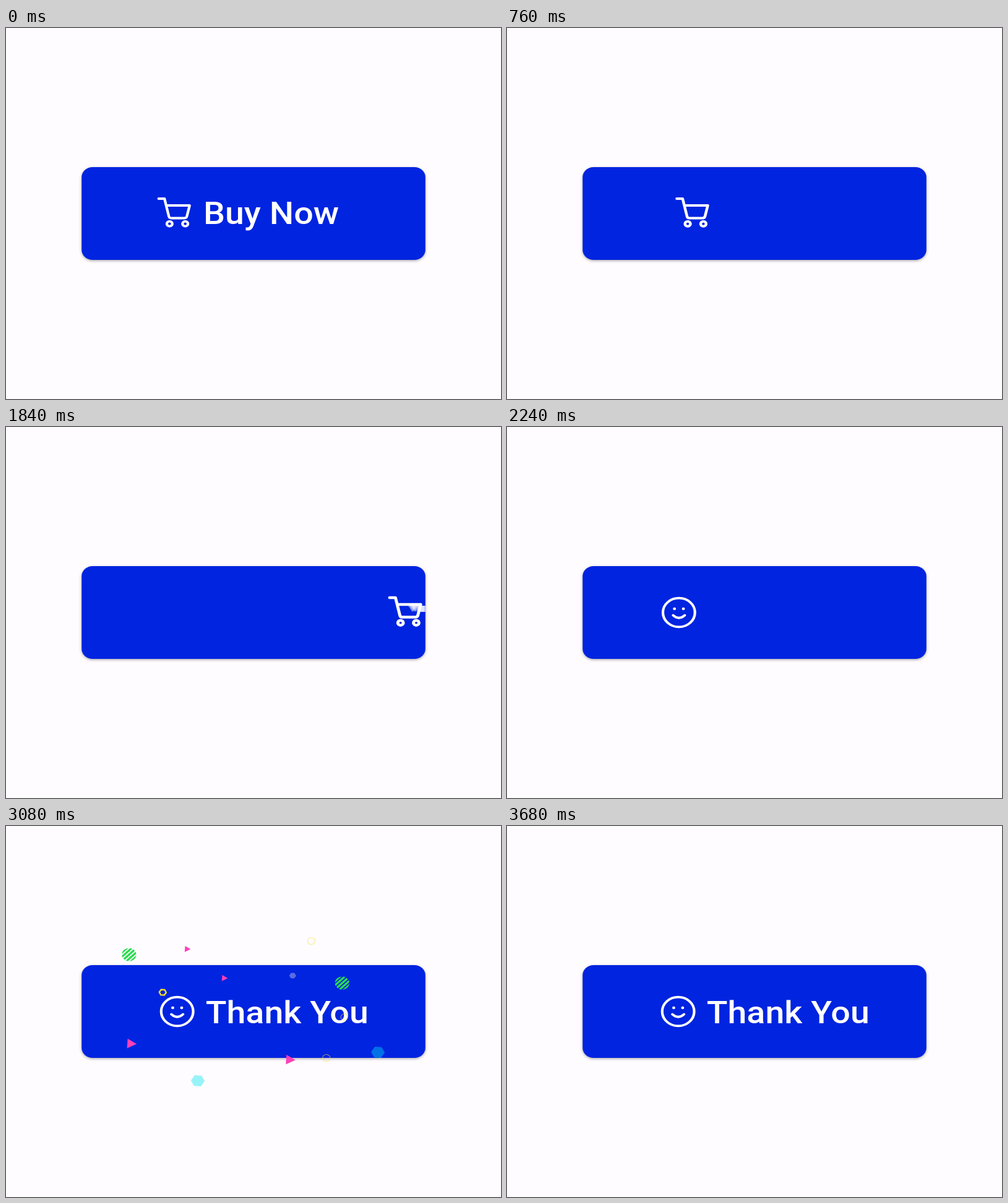
Animation of 800 by 600 pixels, one loop 3760 ms. Source, as an HTML page with a canvas:

```html
<!DOCTYPE html>
<html lang="en">
<head>
<meta charset="utf-8">
<title>Buy button</title>
<style>
  html, body { margin: 0; width: 100%; height: 100%; overflow: hidden; background: #fefcff; }
  canvas { display: block; }
</style>
</head>
<body>
<canvas width="800" height="600"></canvas>
<script>
const ctx = document.querySelector('canvas').getContext('2d');
const LOOP = 3760, STEP = 40;
const CX = 360, CY = 300; // the scene is 720 wide and shown at 10:9

const ramp = (t, from, to) => Math.min(1, Math.max(0, (t - from) / (to - from)));
const smooth = p => (1 - Math.cos(Math.PI * p)) / 2;
const mix = (a, b, p) => a + (b - a) * p;

// kind, offset from the centre and radius, at spread 1
const confetti = [
  ['stripes', -181, -92, 10.5], ['stripes', 129, -46, 10.5],
  ['triangle', -97, -101, 5.6], ['triangle', -43, -54, 5.6],
  ['triangle', -179, 52, 9], ['triangle', 52, 78, 9],
  ['ring', 84, -114, 5.5], ['ring', 132, 9, 5], ['ring', 106, 75, 5.5],
  ['nut', -132, -31, 5], ['pale', 57, -58, 5],
  ['cyan', -81, 112, 10], ['cyan', 181, 66, 10]
];
const colors = {
  stripes: '#2bdc50', triangle: '#ff3fb8', ring: 'rgba(246,222,60,.6)',
  nut: '#f5dc28', pale: 'rgba(160,170,230,.55)', cyan: 'rgba(0,230,240,.4)'
};

function at(x, y, draw) {
  ctx.save();
  ctx.translate(x, y);
  draw();
  ctx.restore();
}

function polygon(sides, r) {
  ctx.beginPath();
  for (let i = 0; i < sides; i++) {
    const a = i * 2 * Math.PI / sides;
    ctx.lineTo(r * Math.cos(a), r * Math.sin(a));
  }
  ctx.closePath();
}

function circle(x, y, r) {
  ctx.beginPath();
  ctx.arc(x, y, r, 0, 2 * Math.PI);
}

function whitePen(width) {
  ctx.strokeStyle = ctx.fillStyle = '#fff';
  ctx.lineWidth = width;
  ctx.lineCap = ctx.lineJoin = 'round';
}

function label(text, x, y, alpha) {
  ctx.globalAlpha = alpha;
  ctx.fillStyle = '#fff';
  ctx.font = '500 50px Roboto, sans-serif';
  ctx.fillText(text, x, y);
  ctx.globalAlpha = 1;
}

function cart(width) {
  whitePen(width);
  ctx.stroke(new Path2D('M-22.5-24H-14L-7.5 5Q-7 7.5-4 7.5H14.5Q18 7.5 18.6 4.5L22.6-13H-11.5'));
  for (const x of [-6.6, 16.2]) {
    circle(x, 16.7, 4);
    ctx.stroke();
  }
}

function face() {
  whitePen(3.8);
  circle(0, 0, 23.3);
  ctx.stroke();
  ctx.stroke(new Path2D('M-8.5 4.5Q0 13 8.5 4.5'));
  for (const x of [-6.5, 6.5]) {
    circle(x, -6, 2.2);
    ctx.fill();
  }
}

function goods(t, cartX, cartY) {
  const lead = 14 * ramp(t, 1440, 1840) ** 1.5;
  const smear = 5 * ramp(t, 1640, 1840);
  const fall = start => -80 * (1 - ramp(t, start, start + 130) ** 2);
  ctx.fillStyle = '#fff';
  ctx.globalAlpha = smear ? .5 : 1;
  for (const blur of smear ? [-.5, 0, .5] : [0]) {
    const x = cartX + lead + smear * blur;
    at(x - 1, cartY - 6 + fall(1090), () => ctx.fill(new Path2D('M-6-5H6L0 5Z')));
    at(x + 11, cartY - 6 + fall(1120), () => ctx.fillRect(-5.2, -5, 10.4, 10));
  }
  ctx.globalAlpha = 1;
}

function cartScene(t) {
  const run = 220.5 * (Math.max(0, t - 1436) / 404) ** 1.5;
  const x = mix(244.5, CX, smooth(ramp(t, 600, 1120))) + run;
  const y = CY + 5 * Math.sin(Math.PI * ramp(t, 1210, 1350));
  if (t >= 1080) goods(t, x, y);
  at(x, y, () => cart(mix(3.8, 4.4, ramp(t, 600, 1120))));
}

function ripple(p) {
  if (p <= 0 || p >= 1) return;
  circle(CX, CY, 104.5 * p);
  ctx.strokeStyle = `rgba(255,255,255,${.7 * (1 - p)})`;
  ctx.lineWidth = 14 * (1 - p);
  ctx.stroke();
}

function button(t) {
  const press = smooth(ramp(t, 40, 280)) - smooth(ramp(t, 400, 560));
  const scale = 1 - .029 * press;
  ctx.save();
  ctx.translate(CX, CY);
  ctx.scale(scale, scale);
  ctx.translate(-CX, -CY);
  ctx.beginPath();
  ctx.roundRect(110, 225, 500, 150, 16);
  ctx.shadowColor = 'rgba(0,0,0,.35)';
  ctx.shadowBlur = 4;
  ctx.shadowOffsetY = 1.5;
  ctx.fillStyle = '#0024e0';
  ctx.fill();
  ctx.shadowColor = 'transparent';
  ctx.clip();

  if (t < 1960) cartScene(t);
  label('Buy Now', 287, 316.5, 1 - ramp(t, 400, 560));
  ripple(ramp(t, 160, 560));

  if (t >= 1960) {
    const enter = smooth(ramp(t, 1980, 2440));
    const settle = smooth(ramp(t, 2453, 2866));
    at(mix(84, CX, enter) - 111 * settle, CY, face);
    const rise = smooth(ramp(t, 2650, 2860));
    label('Thank You', 290.5, 319.3 + 45 * (1 - rise), rise);
  }
  ctx.restore();
}

function piece(kind, r) {
  ctx.fillStyle = ctx.strokeStyle = colors[kind];
  ctx.lineCap = 'butt';
  if (kind === 'stripes') {
    circle(0, 0, r);
    ctx.clip();
    ctx.rotate(-Math.PI / 4);
    for (let i = -2; i <= 2; i++) ctx.fillRect(-r, (i * .46 - .15) * r, 2 * r, r * .3);
  } else if (kind === 'ring') {
    circle(0, 0, r);
    ctx.lineWidth = 1;
    ctx.stroke();
  } else if (kind === 'nut') {
    polygon(6, r);
    ctx.lineWidth = r * .45;
    ctx.stroke();
  } else {
    polygon(kind === 'triangle' ? 3 : 6, r);
    ctx.fill();
  }
}

function burst(t) {
  const spread = (t - 2840) / 240;
  if (spread <= 0) return;
  ctx.globalAlpha = 1 - ramp(t, 3480, 3680);
  confetti.forEach(([kind, x, y, r], i) => at(CX + x * spread, CY + y * spread, () => {
    if (kind !== 'stripes') ctx.rotate(.06 + (spread - 1) * (i % 2 ? .6 : -.6));
    piece(kind, r * (.6 + .4 * spread));
  }));
  ctx.globalAlpha = 1;
}

function draw(now) {
  const t = Math.floor(now % LOOP / STEP) * STEP;
  ctx.setTransform(1, 0, 0, 1, 0, 0);
  ctx.fillStyle = '#fefcff';
  ctx.fillRect(0, 0, 800, 600);
  ctx.scale(10 / 9, 1);
  button(t);
  burst(t);
}

const start = performance.now();
function tick() {
  draw(performance.now() - start);
  requestAnimationFrame(tick);
}
tick();
</script>
</body>
</html>
```
